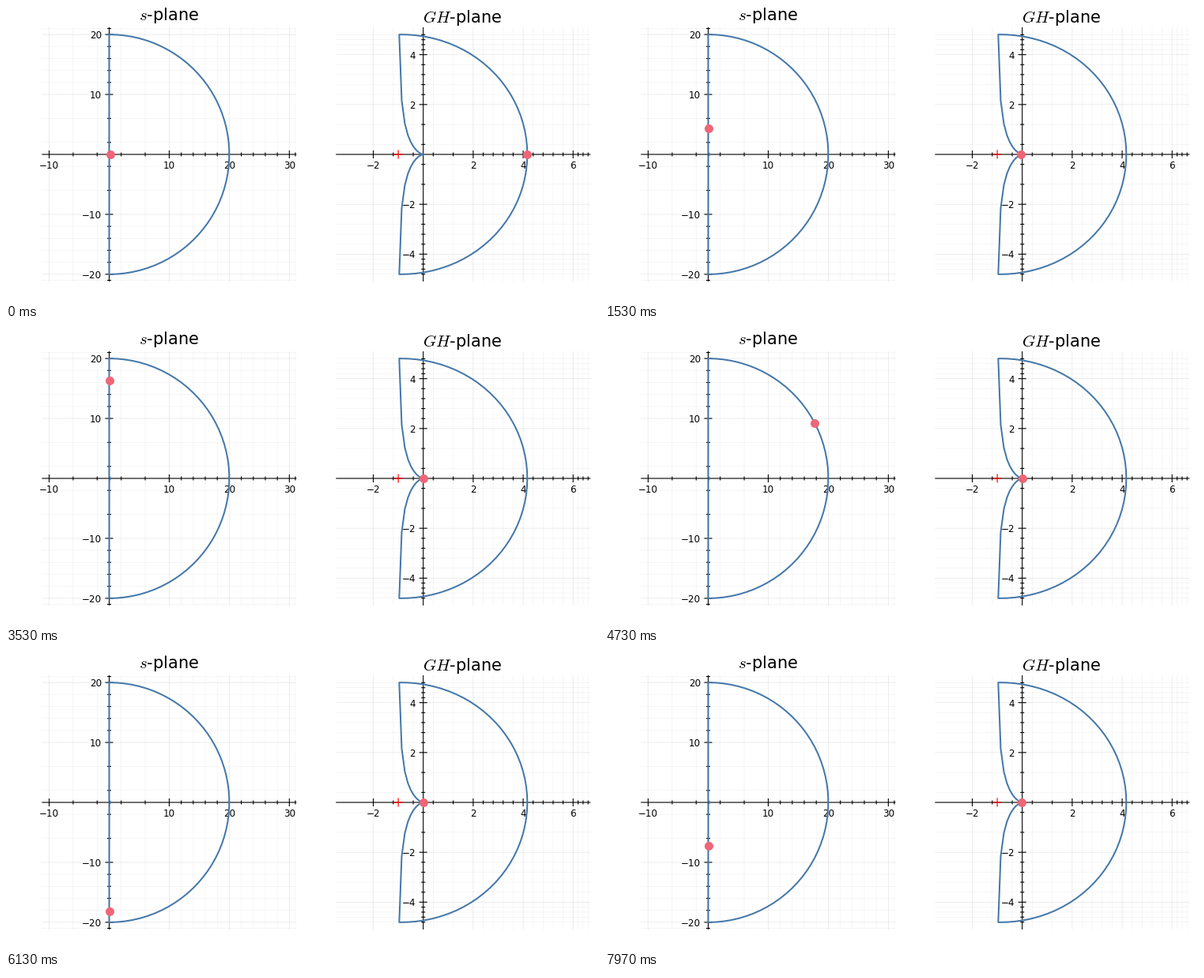
A matplotlib script for the animation above (8 s loop, 750 by 375 pixels).

```python
import numpy as np
import matplotlib.pyplot as plt
from matplotlib.animation import FuncAnimation

W, H, DPI = 750, 375, 100
PX = 72 / DPI
LOOP, STEP, FPS = 8000, 20, 30
BLUE, ROSE = "#4477aa", "#ee6677"

plt.rcParams.update({"font.family": "DejaVu Sans", "mathtext.fontset": "cm"})


def gain(s):
    return 1 / (s * (s + 1))


def arc(radius, start, end, n):
    return radius * np.exp(1j * np.radians(np.linspace(start, end, n)))


def climb(start, end):
    return 1j * np.linspace(start, end, 50)


# closed contour: quarter detour, axis up, big arc, axis down, quarter detour
contour = np.concatenate([
    arc(0.2, 0, 90, 25), climb(0.2, 10), climb(10, 20),
    arc(20, 90, -90, 50),
    climb(-20, -10), climb(-10, -0.2), arc(0.2, -90, 0, 25)])
image = gain(contour)

fig = plt.figure(figsize=(W / DPI, H / DPI), dpi=DPI, facecolor="white")
ax = fig.add_axes([0, 0, 1, 1])
ax.set(xlim=(0, W), ylim=(H, 0))
ax.axis("off")


def minor_values(ticks, lo, hi):
    """Four marks in each gap, and half a gap past ends that do not span zero."""
    ends = list(ticks)
    if ticks[1] < 0:
        ends.insert(0, ticks[0] - (ticks[1] - ticks[0]) / 2)
    ends.append(ticks[-1] + (ticks[-1] - ticks[-2]) / 2)
    vals = np.concatenate([np.linspace(a, b, 6)[1:-1]
                           for a, b in zip(ends, ends[1:])])
    return vals[(vals >= lo) & (vals <= hi)]


class Plane:
    def __init__(self, ox, oy, scale, box, xticks, yticks):
        self.ox, self.oy, self.scale, self.box = ox, oy, scale, box
        left, top, right, bottom = box
        xlim = (left - ox) / scale, (right - ox) / scale
        ylim = (oy - bottom) / scale, (oy - top) / scale
        xs, ys = np.array(xticks), np.array(yticks)
        xminor, yminor = minor_values(xticks, *xlim), minor_values(yticks, *ylim)

        for xv, yv, alpha in ((xminor, yminor, 0.05), (xs, ys, 0.1)):
            style = dict(color="black", lw=0.7 * PX, alpha=alpha, snap=False)
            ax.vlines(self.x(xv), top, bottom, zorder=1, **style)
            ax.hlines(self.y(yv), left, right, zorder=1, **style)

        style = dict(color="black", lw=1.1 * PX, snap=False, zorder=2)
        ax.hlines(oy, left, right, **style)
        ax.vlines(ox, top, bottom, **style)
        for xv, yv, r in ((xminor, yminor, 2.5), (xs, ys, 5)):
            ax.vlines(self.x(xv), oy - r, oy + r, **style)
            ax.hlines(self.y(yv), ox - r, ox + r, **style)

        for v in xticks:
            self.label(self.x(v), oy + 8.5, v, "center", "top")
        for v in yticks:
            self.label(ox - 9.5, self.y(v), v, "right", "center_baseline")

    def x(self, v):
        return self.ox + v * self.scale

    def y(self, v):
        return self.oy - v * self.scale

    def label(self, x, y, v, ha, va):
        ax.text(x, y, f"{v}".replace("-", "\u2212"), fontsize=8.57,
                ha=ha, va=va, zorder=2)

    def title(self, text, baseline):
        ax.text((self.box[0] + self.box[2]) / 2 - 0.8, baseline, text,
                fontsize=15, ha="center", va="baseline", zorder=2)

    def curve(self, pts):
        ax.plot(self.x(pts.real), self.y(pts.imag), color=BLUE, lw=2 * PX,
                snap=False, solid_joinstyle="round", zorder=3)

    def cross(self, p, r):
        cx, cy = self.x(p.real), self.y(p.imag)
        style = dict(color="red", lw=1.2 * PX, snap=False, zorder=4)
        ax.hlines(cy, cx - r, cx + r, **style)
        ax.vlines(cx, cy - r, cy + r, **style)

    def dot(self):
        return ax.plot([], [], "o", ms=11 * PX, mfc=ROSE, mew=0,
                       snap=False, zorder=5)[0]

    def place(self, dot, p):
        dot.set_data([self.x(p.real)], [self.y(p.imag)])


s_plane = Plane(130.5, 188, 7.595, (45.4, 27, 367.4, 349),
                [-10, 10, 20, 30], [-20, -10, 10, 20])
g_plane = Plane(527.7, 188, 31.59, (417.3, 27, 739.3, 349),
                [-2, 2, 4, 6], [-4, -2, 2, 4])
s_plane.title("$s$-plane", 18)
g_plane.title("$GH$-plane", 21)
s_plane.curve(contour)
g_plane.curve(image)
g_plane.cross(-1 + 0j, 5.5)

s_dot, g_dot = s_plane.dot(), g_plane.dot()


def update(n):
    # the dots advance 30 times a second, on ticks rounded to 10 ms
    t = n * STEP + STEP / 2
    i = int((t + 5) * FPS / 1000)
    s_plane.place(s_dot, contour[i])
    g_plane.place(g_dot, image[i])
    return s_dot, g_dot


anim = FuncAnimation(fig, update, frames=LOOP // STEP, interval=STEP,
                     repeat=True, repeat_delay=0, blit=False)
plt.show()
```
